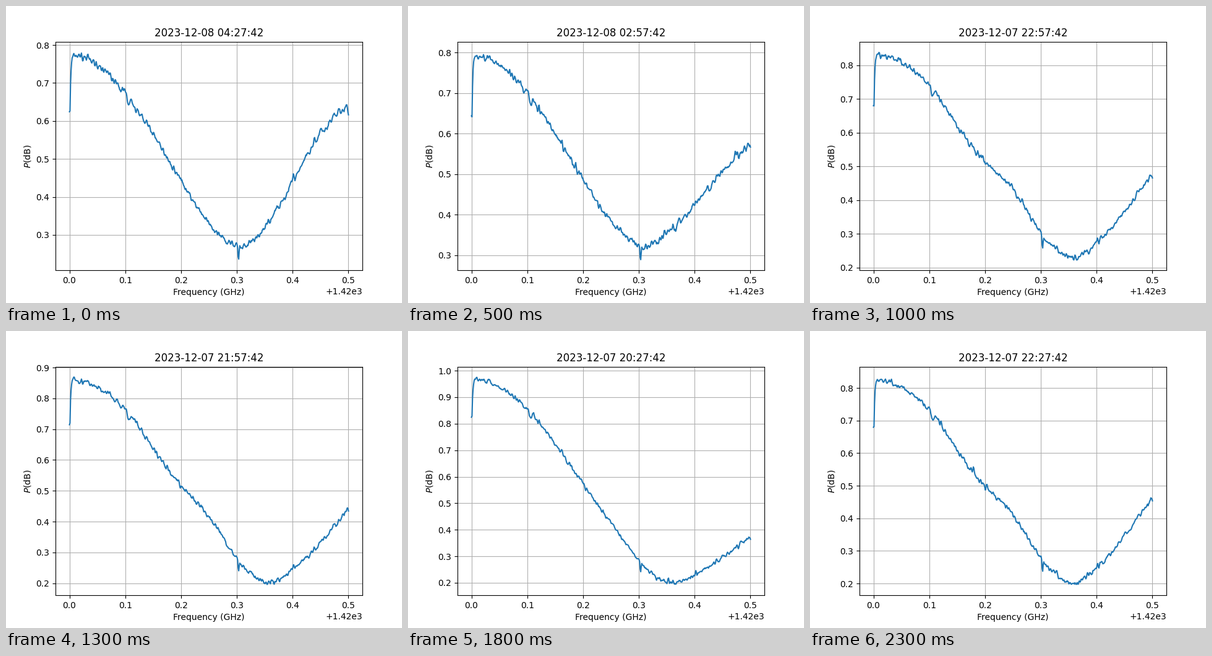
These frames come from a looping animation (640 by 480 pixels, 2400 ms). A matplotlib script:

```python
import numpy as np
import matplotlib.pyplot as plt
from matplotlib.animation import FuncAnimation

POINTS = 512
START = np.datetime64("2023-12-07T19:27:42")

# Half-hour step shown in each 100 ms slot
ORDER = [18, 18, 13, 8, 4, 15, 10, 20, 0, 11, 7, 21,
         12, 5, 16, 17, 9, 1, 2, 14, 3, 22, 19, 6]

# Half-hour step: lowest, highest and last power level
LEVELS = {
    2: (.192, .976, .378),
    6: (.1955, .8335, .467),
    7: (.223, .8395, .48),
    8: (.239, .788, .505),
    17: (.3025, .8055, .596),
    18: (.234, .7815, .638),
    20: (.1497, .765, .692),
}

f = np.linspace(0, .5, POINTS)


def bump(x, center, width, height=1):
    return height * np.exp(-((x - center) / width)**2)


def noise(seed, size):
    raw = np.random.default_rng(seed).normal(0, size, POINTS)
    return np.convolve(raw, [.5, .7, .5], "same")


# Receiver features common to every spectrum
ONSET = -.152 * np.exp(-np.maximum(np.arange(POINTS) - 1, 0) / 1.4)
PATTERN = (noise(1, .0035) + ONSET + bump(f, .106, .0022, -.024)
           + bump(f, .303, .0014, -.04) + bump(f, .4015, .0015, .02)
           + bump(f, .5, .0006, -.008))


def spectrum(t):
    low, high, last = (np.interp(t, list(LEVELS), track)
                       for track in zip(*LEVELS.values()))
    night = (1 + np.tanh((t - 12.5) / 2)) / 2
    valley = .36 - .057 * night
    floor = low + .005 + .031 * night

    # Falling side, with a shelf that comes and goes in the evening
    fall = np.cos(np.pi / 2 * np.minimum(f / valley, 1))
    fall = np.maximum(fall, 0)**1.6
    shelf = bump(f, .255, .037, .032) - bump(f, .165, .04, .028)

    # Rising side, rounded off at the top late at night
    s = np.clip((f - valley) / (.5 - valley), 0, 1)
    rounding = bump(t, 17, 2)
    rise = (1 - rounding) * s**1.4 + rounding * np.sin(np.pi / 2 * s)**2

    y = (floor + (high - .007 - floor) * fall + (last - floor) * rise
         + shelf * bump(t, 7, 4) + PATTERN + noise(100 + t, .0035))
    return np.clip(y, low, high), low, high


fig, ax = plt.subplots(figsize=(6.4, 4.8), dpi=100)
line, = ax.plot(1420 + f, f)
ax.set_xlim(1419.975, 1420.525)
ax.set_xlabel("Frequency (GHz)")
ax.set_ylabel("$P$(dB)")
ax.grid()


def update(n):
    t = ORDER[n]
    y, low, high = spectrum(t)
    pad = .05 * (high - low)
    line.set_ydata(y)
    ax.set_ylim(low - pad, high + pad)
    ax.set_title(str(START + np.timedelta64(30 * t, "m")).replace("T", " "))
    return line,


anim = FuncAnimation(fig, update, frames=len(ORDER), interval=100,
                     repeat=True, repeat_delay=0)
plt.show()
```
